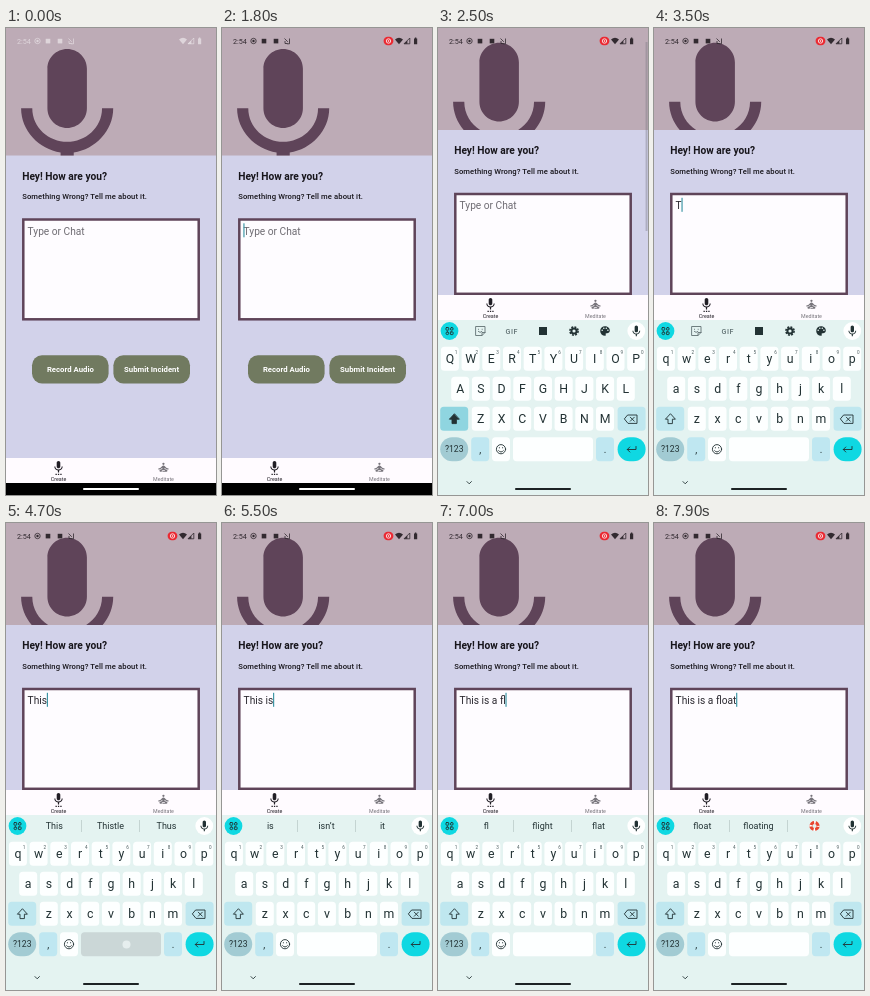
An HTML page for the animation above (8000 ms loop, 210 by 467 pixels).

```html
<!DOCTYPE html>
<html lang="en">
<head>
<meta charset="utf-8">
<title>Voice note form</title>
<style>
  html, body { margin: 0; width: 100%; height: 100%; overflow: hidden; background: #d2d2ea; }
  svg { display: block; width: 100vw; height: 100vh; font-family: Roboto, sans-serif; }
  text { white-space: pre; }
  .mid { text-anchor: middle; }
  .line { fill: none; stroke: #223234; stroke-width: .9; stroke-linecap: round; stroke-linejoin: round; }
  .ink { fill: #223234; }
</style>
</head>
<body>
<svg viewBox="0 0 210 467" preserveAspectRatio="none">
  <defs>
    <path id="mic" d="M12 14c1.66 0 3-1.34 3-3V5c0-1.66-1.34-3-3-3S9 3.34 9 5v6c0 1.66 1.34 3 3 3zM17.3 11c0 3-2.54 5.1-5.3 5.1S6.7 14 6.7 11H5c0 3.41 2.72 6.23 6 6.72V21h2v-3.28c3.28-.48 6-3.3 6-6.72h-1.7z"/>
    <clipPath id="headClip"><rect id="headCut" width="210" height="127.5"/></clipPath>
  </defs>

  <rect width="210" height="467" fill="#d2d2ea"/>
  <g clip-path="url(#headClip)">
    <rect width="210" height="128" fill="#bdabb6"/>
    <g id="bigMic"><use href="#mic" transform="translate(-17.8 7.85) scale(6.58)" fill="#5f4459"/></g>
  </g>

  <g id="page">
    <text x="16.2" y="151.7" font-size="10.2" font-weight="600" fill="#17151b">Hey! How are you?</text>
    <text x="16.2" y="171" font-size="7.65" font-weight="500" letter-spacing=".1" fill="#17151b">Something Wrong? Tell me about it.</text>
    <rect x="17.3" y="191.5" width="175.4" height="99.8" fill="#fefcff" stroke="#5f4459" stroke-width="2.5"/>
    <text id="hint" x="21.6" y="206.7" font-size="10.2" fill="#6f6c73">Type or Chat</text>
    <text id="typed" x="21.6" y="206.7" font-size="10.2" fill="#2b2930"></text>
    <rect id="caret" y="195.3" width="1.1" height="14" fill="#2f8f9f"/>
    <g fill="#717a60">
      <rect x="26" y="327.2" width="76.6" height="28.2" rx="10"/>
      <rect x="107.4" y="327.2" width="76.6" height="28.2" rx="10"/>
    </g>
    <g class="mid" font-size="7.75" font-weight="700" fill="#fff">
      <text x="64.4" y="344">Record Audio</text>
      <text x="145.6" y="344">Submit Incident</text>
    </g>
  </g>

  <g id="status">
    <text x="11" y="15.6" font-size="7.2" fill="currentColor">2:54</text>
    <g fill="none" stroke="currentColor" stroke-width=".8">
      <circle cx="31.5" cy="13" r="2.7"/>
      <path d="M62.5 10.5l3.3 3.3M63 13v2.5h2.5M67.5 10.5v5.3h-2.6"/>
      <path d="M187.8 10v5.8h-5.8z"/>
    </g>
    <g fill="currentColor">
      <circle cx="31.5" cy="13" r="1.2"/>
      <rect x="39.7" y="10.8" width="4.6" height="4.6"/>
      <rect x="51.7" y="10.8" width="4.6" height="4.6"/>
      <path d="M173 11.4Q177 8.2 181 11.4L177 16.2z"/>
      <path d="M185.4 12.4v3.4h-3.4z"/>
      <path d="M192 10.4h.9v-.8h1.4v.8h.9v5.8h-3.2z"/>
    </g>
  </g>
  <g id="chip">
    <rect x="161.6" y="8.7" width="9.8" height="8.6" rx="4.2" fill="#ea2a33"/>
    <circle cx="166.5" cy="13" r="2.2" fill="none" stroke="#fff" stroke-width=".8"/>
    <circle cx="166.5" cy="13" r=".8" fill="#fff"/>
  </g>

  <rect id="scrollbar" x="207.6" y="14" width="1.9" height="189" fill="#77757f"/>

  <g id="nav">
    <rect y="430" width="210" height="210" fill="#fffbff"/>
    <g fill="#211e25">
      <use href="#mic" transform="translate(45.3 431.8) scale(.6)"/>
      <path d="M49.5 445.7h1.3v1.2h-1.3zM51.9 445.7h1.3v1.2h-1.3zM54.3 445.7h1.3v1.2h-1.3z"/>
      <text class="mid" x="52.5" y="453.2" font-size="5.3">Create</text>
    </g>
    <g fill="#77747b">
      <g transform="translate(150.6 432.4) scale(.57)">
        <circle cx="12" cy="6" r="2"/>
        <path d="M21 16v-2c-2.24 0-4.16-.96-5.6-2.68l-1.34-1.6A2 2 0 0 0 12.5 9h-1a2 2 0 0 0-1.55.72l-1.34 1.6C7.16 13.04 5.24 14 3 14v2c2.77 0 5.19-1.17 7-3.25V15l-3.9 1.55A1.8 1.8 0 0 0 6.8 20H9a2.5 2.5 0 0 1 2.5-3h3v1h-3c-.8 0-1.5.7-1.5 2h7.2a1.8 1.8 0 0 0 .7-3.45L14 15v-2.25c1.8 2.08 4.23 3.25 7 3.25z"/>
      </g>
      <text class="mid" x="157.5" y="453.2" font-size="5.3">Meditate</text>
    </g>
  </g>
  <g id="sysbar">
    <rect y="455" width="210" height="12" fill="#000"/>
    <rect x="77" y="460" width="56" height="1.9" rx=".9" fill="#fff"/>
  </g>

  <g id="board">
    <rect y="292" width="210" height="175" fill="#e4f3f1"/>
    <circle cx="11.5" cy="303" r="8.9" fill="#0fd8e2"/>
    <g class="line">
      <rect x="8" y="299.5" width="2.7" height="2.7" rx=".6"/>
      <rect x="12.4" y="299.5" width="2.7" height="2.7" rx="1.3"/>
      <rect x="8" y="303.9" width="2.7" height="2.7" rx="1.3"/>
      <rect x="12.4" y="303.9" width="2.7" height="2.7" rx=".6"/>
    </g>
    <circle cx="198.3" cy="303" r="8.9" fill="#fff"/>
    <use href="#mic" class="ink" transform="translate(191.6 296.5) scale(.56)"/>

    <g id="tools">
      <g class="line" style="stroke:#627274">
        <path d="M38 298.5h9v6l-3 3h-6zM47 304.5h-3v3M40.3 303.5q1.8 2 3.6 0M40.5 301.2v.2M44.2 301.2v.2"/>
      </g>
      <text class="mid" x="73.8" y="305.7" font-size="7.2" font-weight="500" letter-spacing=".6" fill="#627274">GIF</text>
      <rect class="ink" x="101" y="299" width="8" height="8"/>
      <circle cx="136" cy="303" r="4.1" fill="none" stroke="#223234" stroke-width="1.6" stroke-dasharray="1.9 1.32"/>
      <circle cx="136" cy="303" r="2.6" fill="none" stroke="#223234" stroke-width="2"/>
      <path class="ink" d="M167 298.2a4.8 4.8 0 1 0 0 9.6c1.5 0 .4-1.6.7-2.2.5-1 4.1.2 4.1-3.2 0-2.4-2.2-4.2-4.8-4.2z"/>
      <g fill="#e4f3f1">
        <circle cx="164.2" cy="302.3" r=".8"/><circle cx="165.8" cy="300.2" r=".8"/>
        <circle cx="168.3" cy="300.2" r=".8"/><circle cx="169.9" cy="302.3" r=".8"/>
      </g>
    </g>

    <g id="tips">
      <path d="M75.5 297v12M133.5 297v12" stroke="#bccccb" stroke-width=".8"/>
      <g class="mid" font-size="9" fill="#223234">
        <text class="tip" x="48.3" y="306.2"></text>
        <text class="tip" x="104.5" y="306.2"></text>
        <text class="tip" x="160.5" y="306.2"></text>
      </g>
      <g id="buoy" fill="none" stroke-width="3">
        <circle cx="160.5" cy="303" r="3.6" stroke="#e8452f"/>
        <circle cx="160.5" cy="303" r="3.6" stroke="#fff" stroke-dasharray="1.6 4.055" stroke-dashoffset=".8"/>
      </g>
    </g>

    <g id="keys"></g>
    <path id="shift" class="line" d="M16.2 386l-4.8 5.2h2.6v4.4h4.4v-4.4h2.6z"/>
    <path class="line" d="M190 387h9v8.4h-9l-3.4-4.2zM192.3 389.2l4 4M196.3 389.2l-4 4"/>
    <g class="line">
      <circle cx="63" cy="421.2" r="4.6"/>
      <path d="M60.6 422.6q2.4 3 4.8 0M61.4 419.6v.3M64.6 419.6v.3"/>
      <path d="M198 418.5v3h-8.6M191.8 419l-2.5 2.5 2.5 2.5"/>
      <path d="M29 453.6l2.2 2.2 2.2-2.2"/>
    </g>
    <g class="mid" fill="#223234">
      <text x="16.2" y="424.3" font-size="8.6">?123</text>
      <text x="42.2" y="424.5" font-size="10">,</text>
      <text x="167" y="424.5" font-size="10">.</text>
    </g>
    <circle id="press" cx="120.5" cy="421.5" r="4" fill="#e6eeee"/>
    <rect x="77" y="460" width="56" height="1.9" rx=".9" fill="#1c2224"/>
  </g>
</svg>

<script>
const NS = 'http://www.w3.org/2000/svg';
const LOOP = 8000, FOCUS = 1800, SLIDE = 1850, SLIDE_MS = 280;
const PHRASE = 'This is a float';
const PRESSED = [3400, 3800, 4100, 4400, 4800, 5100, 5400, 5700, 5900, 6100, 6500, 6800, 7100, 7400, 7700];
// Suggestions by number of typed characters
const TIPS = ['', 'T I The', 'The This That', 'This Thing Think', 'This Thistle Thus',
  'is was will', 'is in it', 'is isn’t it', 'a the not', 'a an at', 'lot good great',
  'for few from', 'fl flight flat', 'flow floor float', 'float floating floats', 'float floating'];

const $ = id => document.getElementById(id);
const clamp = x => Math.min(1, Math.max(0, x));
const show = (el, on) => el.setAttribute('visibility', on ? 'visible' : 'hidden');
const move = (el, y) => el.setAttribute('transform', `translate(0 ${y})`);
const setText = (el, s) => { if (el.textContent !== s) el.textContent = s; };

function add(tag, attrs, text = '') {
  const el = document.createElementNS(NS, tag);
  for (const k in attrs) el.setAttribute(k, attrs[k]);
  el.textContent = text;
  return $('keys').appendChild(el);
}
const key = (x, y, width, fill, rx = 3.6) =>
  add('rect', { x, y, width, height: 24, rx, fill });

const letters = [];
[['qwertyuiop', 11.9, 318.8], ['asdfghjkl', 22.2, 348.8], ['zxcvbnm', 42.8, 378.8]].forEach(([row, x0, y], r) => {
  [...row].forEach((ch, i) => {
    const x = x0 + i * 20.7;
    key(x - 9, y, 18, '#fdffff');
    letters.push([add('text', { x, y: y + 16.3, 'font-size': 12.3, class: 'mid ink' }), ch]);
    if (!r) add('text', { x: x + 6.2, y: y + 7, 'font-size': 4.6, class: 'mid', fill: '#4c5c5e' }, (i + 1) % 10);
  });
});
const shiftKey = key(2.2, 378.8, 28, '#bfe7ef');
key(179.6, 378.8, 28, '#bfe7ef');
key(2.2, 409.2, 28, '#a2cbd3', 12);
key(33.2, 409.2, 18, '#bfe7f1');
key(54, 409.2, 18, '#fdffff');
const space = key(75, 409.2, 80, '#fdffff');
key(158, 409.2, 18, '#bfe7f1');
key(179.6, 409.2, 28, '#0fd8e2', 12);

const tips = document.querySelectorAll('.tip');

function render(t) {
  // Status bar darkens while the recording chip appears
  const dark = clamp((t - 100) / 700);
  const mix = (a, b) => Math.round(a + (b - a) * dark);
  $('status').style.color = `rgba(${mix(255, 50)},${mix(255, 42)},${mix(255, 48)},${.5 + .5 * dark})`;
  $('chip').setAttribute('opacity', dark);

  // Keyboard slide, page scroll and header parallax
  const open = t >= SLIDE;
  const left = (1 - clamp((t - SLIDE) / SLIDE_MS)) ** 2;
  const scroll = 25.5 * (1 - left);
  move($('page'), -scroll);
  move($('bigMic'), -scroll / 4);
  $('headCut').setAttribute('height', 127.5 - scroll);
  move($('nav'), open ? -163 : 0);
  move($('board'), 186 * left);
  show($('board'), open);
  show($('sysbar'), !open);
  $('scrollbar').setAttribute('opacity', open ? .4 * clamp((2800 - t) / 300) : 0);

  // Typing
  const n = PRESSED.filter(p => p <= t).length;
  setText($('typed'), PHRASE.slice(0, n));
  show($('hint'), !n);
  const last = n ? PRESSED[n - 1] : FOCUS;
  show($('caret'), t >= FOCUS && (t - last) % 1000 < 500);
  $('caret').setAttribute('x', 21.4 + (n ? $('typed').getComputedTextLength() : 0));

  // Keyboard state
  letters.forEach(([el, ch]) => setText(el, n ? ch : ch.toUpperCase()));
  $('shift').style.fill = n ? 'none' : '#223234';
  shiftKey.setAttribute('fill', n ? '#bfe7ef' : '#8fd5e0');
  const held = PRESSED.some((p, i) => PHRASE[i] === ' ' && t >= p - 100 && t < p);
  space.setAttribute('fill', held ? '#cbd7d7' : '#fdffff');
  show($('press'), held);

  const hints = t >= 3600;
  show($('tools'), !hints);
  show($('tips'), hints);
  const words = TIPS[n].split(' ');
  tips.forEach((el, i) => setText(el, words[i] || ''));
  show($('buoy'), n === PHRASE.length);
}

const start = performance.now();
function tick() {
  render((performance.now() - start) % LOOP);
  requestAnimationFrame(tick);
}
tick();
</script>
</body>
</html>
```
